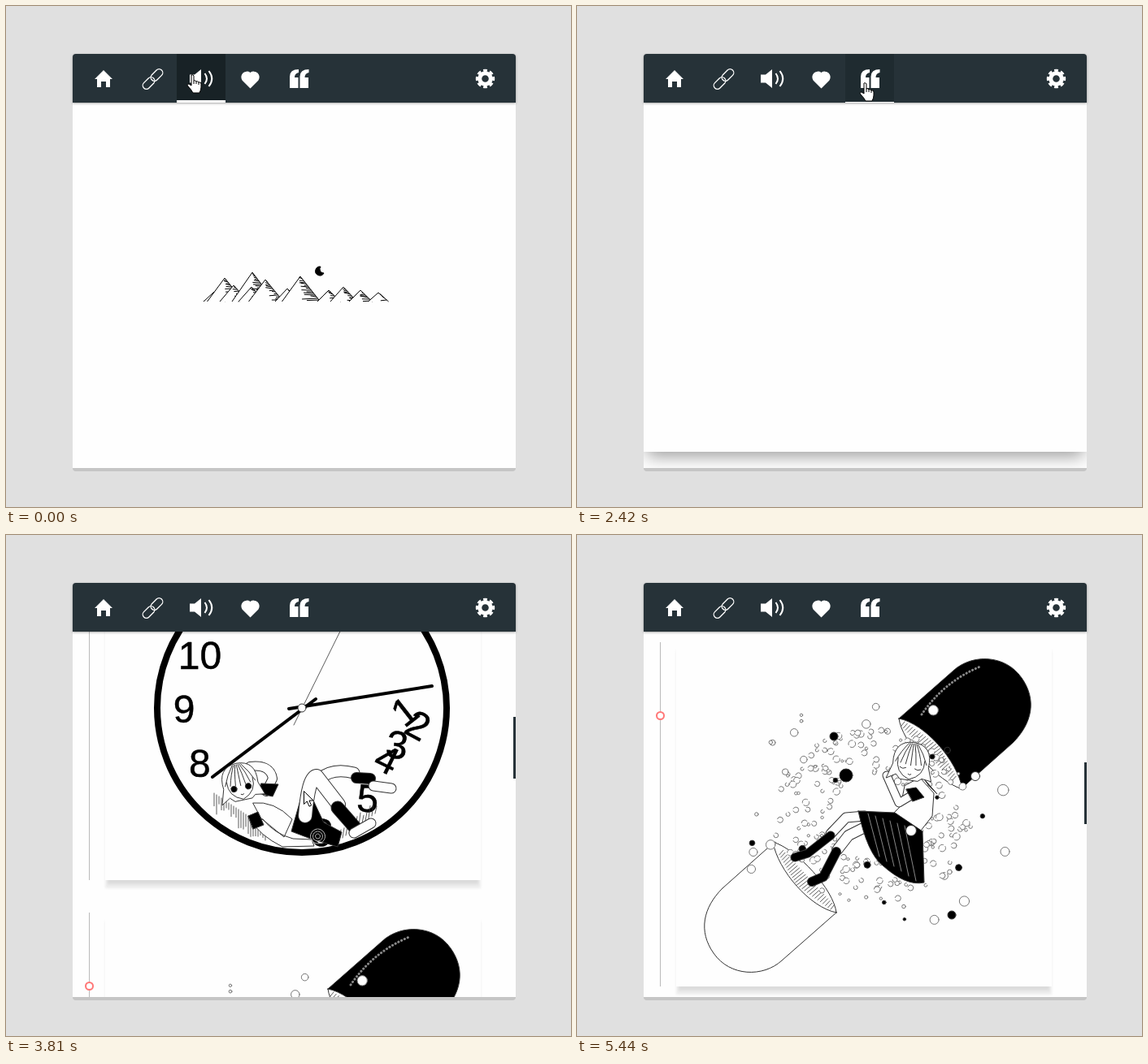
These frames come from a looping animation (695x617 px, 5.72 s). An HTML page:

```html
<!DOCTYPE html>
<html lang="en">
<head>
<meta charset="utf-8">
<title>Sliding tab panels</title>
<style>
html, body { margin: 0; width: 100%; height: 100%; overflow: hidden; background: #e0e0e0; }
#stage { position: relative; width: 695px; height: 617px; overflow: hidden; background: #e0e0e0; }
#stage div, #stage svg { position: absolute; box-sizing: border-box; }
#view { left: 82px; top: 119px; width: 545px; height: 450px; overflow: hidden; background: #fefefe; }
#base { left: 82px; top: 561px; width: 545px; height: 12px; border-radius: 0 0 4px 4px; background: #c5c5c5; }
#bar { left: 82px; top: 59px; width: 545px; height: 60px; border-radius: 4px 4px 0 0; background: #263238; box-shadow: 0 1px 3px rgba(0,0,0,.35); }
.panel, .scroll { left: 0; top: 0; width: 545px; height: 450px; }
.panel { background: #fefefe; box-shadow: 0 9px 20px -4px rgba(0,0,0,.4); }
.scroll { overflow: hidden; }
#thumb { right: 0; width: 3px; height: 76px; background: #263238; }
.item { left: 0; width: 545px; height: 424px; }
.line { left: 20px; top: 0; width: 1px; height: 424px; background: #bbb; }
.dot { left: 15px; top: 85px; width: 11px; height: 11px; border: 2px solid #f77; border-radius: 50%; background: #fff; }
.card { left: 40px; top: 0; width: 462px; height: 424px; background: #fefefe; box-shadow: 0 10px 3px rgba(0,0,0,.07), 0 8px 3px -3px rgba(0,0,0,.07); }
.caption { left: 0; top: 245px; width: 462px; height: 112px; padding: 24px; background: rgba(0,0,0,.4); color: #fff; font: 14.3px/16px "Liberation Sans", Arial, sans-serif; text-align: justify; }
.tag { left: 35px; top: 83px; top: 70px; width: 84px; height: 25px; border-radius: 12px 12px 12px 0; background: #999; color: #fff; font: bold 10px/25px "Open Sans", sans-serif; text-align: center; white-space: nowrap; box-shadow: 1px 2px 3px rgba(0,0,0,.25); }
.art { left: 0; top: 0; fill: #fefefe; stroke: #333; stroke-linejoin: round; stroke-linecap: round; }
.art .k { fill: #000; }
.art .n { fill: none; }
.art .h { fill: url(#hatch); }
.art text { fill: #000; stroke: #000; stroke-width: .5; font: 48px "Liberation Sans", Arial, sans-serif; text-anchor: middle; }
</style>
</head>
<body>
<div id="stage">
  <div id="base"></div>
  <div id="view">
    <svg id="hills" width="545" height="450" viewBox="82 119 545 450" stroke="#000"></svg>
    <div class="panel" id="blank"></div>
    <div class="panel" id="posts"><div class="scroll"><div id="list"></div><div id="thumb"></div></div></div>
  </div>
  <svg id="bar" width="545" height="60" viewBox="82 59 545 60">
    <g id="audio"><path d="M210 59h60v60h-60z" fill="#182226"/><rect x="210" width="60" fill="#fff"/></g>
    <g id="quote"><path d="M330 59h60v60h-60z" fill="#182226"/><rect x="330" width="60" fill="#fff"/></g>
    <g fill="#fff">
      <path d="M120 79l11 11h-3v10h-5v-7h-6v7h-5V90h-3z"/>
      <path d="M226 84.500h6l8-6.500v23l-8-6.500h-6z"/>
      <path d="M300.500 101.500l-10-10A7 7 0 0 1 300.500 82a7 7 0 0 1 10 9.500z"/>
      <path id="mark" d="M360 78v4q-5 1-5 6h4.500v13h-10.500V87q0-9 11-9z"/>
      <use href="#mark" x="12.500"/>
    </g>
    <g fill="none" stroke="#fff">
      <path d="M244.500 83q5 6.500 0 13M249.500 80q7.500 9.500 0 19" stroke-width="2"/>
      <g transform="rotate(-45 180.500 90)" stroke-width="1.300">
        <rect x="165" y="85.500" width="17" height="9" rx="4.500"/>
        <rect x="179" y="85.500" width="17" height="9" rx="4.500"/>
      </g>
      <circle cx="589.500" cy="89.500" r="6.800" stroke-width="5"/>
      <circle cx="589.500" cy="89.500" r="9.700" stroke-width="4" pathLength="16" stroke-dasharray="1.200 .8" stroke-dashoffset=".6"/>
    </g>
  </svg>
  <svg width="695" height="617" fill="#fff" stroke="#000">
    <defs><pattern id="hatch" width="7" height="31" patternUnits="userSpaceOnUse">
      <path d="M0 0h7v31H0z" fill="#fefefe" stroke="none"/>
      <path d="M1 0v31M3 4v22M5 0v13M5.500 16v15" stroke="#444" stroke-width=".8"/>
    </pattern></defs>
    <path id="hand" d="M6 1Q8 0 9 2V8Q11 7 12 9Q14 8 15 10Q18 9 18 12V16Q18 19 16 23H8Q6 19 2 15Q0 12 3 12L6 14ZM9 8v4M12 9v3M15 10v3"/>
    <path id="arrow" d="M.5.5V16.500L4.300 13L7 19.200L9.600 18L7 12H12Z"/>
  </svg>
</div>
<script>
// The picture moves in 42 even steps per loop; all motion below is timed in steps.
const LOOP = 5720, STEP = LOOP / 42;
const TEXT = 'Sed non mauris vitae erat consequat auctor eu in elit. Class aptent taciti sociosqu ad litora torquent per conubia nostra, per inceptos himenaeos. Mauris in erat justo. Nullam ac urna eu felis dapibus condimentum sit amet a augue.';
const $ = id => document.getElementById(id);

let seed = 7;
const rand = (a = 0, b = 1) => {
  seed = (seed * 16807) % 2147483647;
  return a + (b - a) * seed / 2147483647;
};
const repeat = (n, draw) => Array.from({ length: n }, (_, i) => draw(i)).join('');
const path = (d, cls = '', extra = '') => `<path class="${cls}" d="${d}" ${extra}/>`;
const dot = (x, y, r, cls = '') => `<circle class="${cls}" cx="${x}" cy="${y}" r="${r}"/>`;
const tube = (d, width, color = '#fefefe') =>
  path(d, 'n', `stroke-width="${width}"`) + path(d, 'n', `stroke-width="${width - 2}" stroke="${color}"`);

function head(x, y, scale, tilt, awake) {
  const eye = side => awake ? dot(side * 10, 7, 4, 'k') : path(`M${side * 10 - 4} 8q4 3 8 0`, 'n');
  return `<g transform="translate(${x} ${y}) rotate(${tilt}) scale(${scale})">` +
    path('M-24 4Q-27-26 0-27Q27-26 24 4L30 22L17 20L12 24H-12L-18 18L-30 25Z') +
    path('M-18-4Q-20 16 0 23Q20 16 18-4', 'n') + eye(-1) + eye(1) + path('M-2 16q2 2 4 0', 'n') +
    path(repeat(7, i => `M${(i - 3) * 2}-25Q${(i - 3) * 5}-14 ${(i - 3) * 7} ${4 - Math.abs(i - 3)}`), 'n') + '</g>';
}

function hills() {
  const peaks = [[256, 352], [269, 335], [280, 344], [303, 328], [302, 346], [319, 337],
    [346, 348], [362, 333], [397, 350], [415, 346], [436, 350], [458, 353]];
  return peaks.map(([x, y]) => {
    const base = 364, height = base - y;
    let d = `M${x - height * .5 - 7} ${base}L${x} ${y}L${x + height * .6 + 6} ${base}`;
    for (let h = 3; h < height; h += 2) {
      const edge = h * (.6 + 6 / height);
      d += `M${x + edge} ${y + h}l${-rand(.2, .8) * (edge + 3)} ${rand(-2, 1)}`;
    }
    return path(d, '', 'fill="#fefefe"');
  }).join('') + path('M387 321a5.500 5.500 0 1 0 4 8a5 5 0 0 1-4-8z');
}

function sandwich() {
  const slice = 'M262 276Q238 270 233 281Q230 294 274 314Q345 351 385 353Q403 351 403 342Q397 329 409 325L510 297Q515 293 509 290L414 250Q405 244 397 247z';
  const arm = (x, y) => tube(`M${x} ${y}l-85 35`, 15) + tube(`M${x - 82} ${y + 34}l-18 7`, 6) +
    path(`M${x - 26} ${y - 5}l20-5l14 21l-17 6z`, 'k') + path(`M${x - 18} ${y - 6}l14 20M${x - 12} ${y - 8}l14 20`, 'n', 'stroke="#fefefe"');
  const leg = (x, y, tilt) => `<g transform="translate(${x} ${y}) rotate(${tilt})">` +
    path('M-9 50L-10 88H10L9 50z') + path('M-8 2H8L10 52H-9z', 'k') +
    path('M8-14Q20-18 26-6Q26 6 10 4Q20-5 8-14z', 'k') + path('M-8 4Q-14-18 0-19Q10-18 13-11L8 4Q0-4-8 4z') + '</g>';
  return leg(428, 202, -5) + leg(528, 203, 18) +
    path('M516 334L541 347L538 352Q527 348 517 365zM235 374Q217 376 218 384L285 424L515 386L500 372z') +
    path('M285 418L290 431Q336 455 370 463Q400 465 403 456V436L514 396V380L405 413L370 431z', 'h') +
    path('M285 416Q303 423 311 426Q318 422 327 430Q345 429 350 435Q361 425 375 431Q388 417 402 421Q410 402 429 410Q443 398 466 401L515 380L390 376L300 395z') +
    path('M350 397L364 402L380 418Q365 414 350 397zM400 384L427 395L424 397zM308 371L335 375L320 384zM398 378L506 327L520 380L430 384z', 'k') +
    path(repeat(3, i => `M400 ${372 + i * 4}L${510 + i * 3} ${338 + i * 14}`), 'n', 'stroke="#bbb" stroke-width=".8"') +
    path('M270 388L345 378L400 374L380 383L294 426z') + arm(251, 401) + arm(292, 412) +
    path('M222 318L234 311L402 356L510 311L523 319L519 326L400 374L350 371L284 354z') + head(268, 367, 1.05, 5, true) +
    path('M233 281L235 311Q265 334 320 355Q368 380 395 377Q404 373 404 351L512 319V293L404 326z', 'h') + path(slice) +
    repeat(9, () => dot(rand(300, 470), rand(272, 312), rand(.4, 1), 'k')) + dot(379, 302, 2, 'k');
}

function clock() {
  const digit = (n, x, y, tilt = 0) => `<text y="17" transform="translate(${x} ${y}) rotate(${tilt})">${n}</text>`;
  const fallen = [[490, 217, -38], [507, 234, 28], [481, 258, 8], [469, 276, 26], [445, 324, 4], [388, 366, 8]];
  return '<circle cx="364" cy="213" r="178" stroke="#000" stroke-width="8"/>' +
    repeat(5, i => digit(i + 8, 364 - 145 * Math.cos((i - 1) * Math.PI / 6), 214 - 133 * Math.sin((i - 1) * Math.PI / 6))) +
    fallen.map(([x, y, tilt], i) => digit(i + 1, x, y, tilt)).join('') +
    path('M348 214L524 186M381 202L254 298', 'n', 'stroke="#000" stroke-width="4"') +
    path('M354 234L438 64', 'n', 'stroke-width=".8"') + dot(364, 213, 5) +
    path(repeat(22, i => `M${256 + i * 3} ${318 + i * 2}v${rand(8, 24)}`) + repeat(14, i => `M${402 + i * 4} ${382 - i * 3}l2 ${-rand(5, 16)}`), 'n', 'stroke-width=".8"') +
    tube('M300 285Q325 282 328 300L320 316', 12) +
    path('M314 306L335 307L328 322L310 318z', 'k') +
    path('M304 330Q330 327 352 350L342 372L314 349zM301 351L316 350Q330 368 353 374L376 375L379 383L340 384Q312 370 301 351z') +
    path('M298 346L310 341L317 357L304 362z', 'k') + head(288, 305, .9, -12, true) +
    path('M368 306L351 365L372 373L408 384L413 366L391 354z', 'k') +
    tube('M386 300Q402 286 428 293', 15) + tube('M431 299L448 300', 14, '#000') + tube('M452 309L474 312', 13) +
    tube('M368 346Q372 298 382 297L409 332', 18) + tube('M408 336L429 360', 17, '#000') + tube('M428 367L449 355', 13) +
    repeat(3, i => path(`M383 ${371 - 3 - i * 3}a${3 + i * 3} ${3 + i * 3} 0 1 0 1 0`, 'n', 'stroke="#bbb"'));
}

function capsule() {
  const half = cls => path('M396 226L463 167C486 146 527 147 547 176C566 203 560 232 536 256L472 313z', cls) +
    path('M396 226C428 232 468 278 474 313C444 304 399 254 396 226z') +
    path(repeat(26, i => `M${399 + i * 2.5} ${235 + i * 2.7}l${4 + Math.min(i, 26 - i) * .7} ${-5 - Math.min(i, 26 - i) * .4}`), 'n', 'stroke-width=".8"');
  const bubble = (near, far, size, cls) => {
    const a = rand(0, 2 * Math.PI), reach = rand(near, far);
    return dot(366 + Math.cos(a) * 112 * reach, 346 + Math.sin(a) * 96 * reach, rand(1.5, size), cls);
  };
  return `<g transform="rotate(180 357.500 345.500)">${half('')}</g>` + half('k') +
    path('M424 221Q451 181 496 162', 'n', 'stroke="#888" stroke-width="3" stroke-dasharray=".2 4"') +
    `<g stroke="#777" stroke-dasharray="9 3">${repeat(220, () => bubble(.5, 1.12, 4.5))}</g>` +
    `<g stroke="#777">${repeat(22, () => bubble(1, 1.55, 7))}</g>` + repeat(13, () => bubble(.6, 1.4, 4.5, 'k')) +
    dot(331, 296, 8, 'k') + dot(316, 248, 5, 'k') + dot(461, 468, 5, 'k') +
    tube('M354 346L331 348L312 368', 13) + tube('M312 370L284 392L268 397', 11, '#000') +
    tube('M358 358L334 370L320 388', 14) + tube('M319 390L303 421L289 427', 12, '#000') +
    path('M403 309L398 334L390 342L423 364L437 346L439 318L422 299z') +
    path('M346 340L391 342L425 365L427 428Q405 433 376 407Q357 392 346 340z', 'k') +
    path(repeat(6, i => `M${358 + i * 9} ${343 + i * 3}L${372 + i * 9} ${396 + i * 6}`), 'n', 'stroke="#aaa" stroke-width=".8"') +
    tube('M416 318L396 330L381 296', 11) +
    path('M405 313L417 311L427 323L413 328zM424 297L443 319L434 310z', 'k') +
    head(411, 280, .92, 8, false) + dot(437, 273, 3, 'k') + dot(411, 364, 6.5) + dot(490, 297, 5.5);
}

const items = [
  { draw: sandwich, top: 123, hover: [24, 26] },
  { draw: clock, top: 1, hover: [29, 33] },
  { draw: capsule, top: 132, hover: [33, 37], tag: '18PM - 03/05/16' }
];
$('hills').innerHTML = hills();
$('list').innerHTML = items.map(({ draw, top, tag }, i) => `<div class="item" style="top:${40 + 464 * i}px">
  <div class="line"></div><div class="dot"></div>
  <div class="card"><svg class="art" width="462" height="424" viewBox="122 ${top} 462 424">${draw()}</svg>
  <div class="caption">${TEXT}</div></div>${tag ? `<div class="tag">${tag}</div>` : ''}</div>`).join('');
const nodes = document.querySelectorAll('.item');

// Key points: [step, ...values].
const pointer = [[2, 222, 84], [3, 262, 120], [4, 266, 184], [5, 258, 134], [7, 238, 96], [15, 238, 96],
  [17, 347, 94], [21, 347, 94], [22, 359, 151], [25, 366, 315], [37, 366, 315], [38, 604, 531], [39, 677, 597]];
const scrolling = [[25, 0], [28, 622], [29, 541], [31, 541], [34, 955]];

const ramp = (s, from, to) => Math.min(1, Math.max(0, (s - from) / (to - from)));
const glide = (s, from) => (1 - Math.cos(Math.PI * ramp(s, from, from + 4.1))) / 2;

function sample(keys, s) {
  const next = Math.max(1, keys.findIndex(k => k[0] > s));
  const last = keys[keys.length - 1];
  if (s >= last[0]) return last.slice(1);
  const a = keys[next - 1], b = keys[next], u = ramp(s, a[0], b[0]);
  return a.slice(1).map((v, i) => v + (b[i + 1] - v) * u);
}

function setPanel(id, open) {
  $(id).style.transform = `translateY(${Math.round(450 * (open - 1))}px)`;
  $(id).style.visibility = open > .001 ? 'visible' : 'hidden';
}

function setTab(id, on) {
  const [back, line] = $(id).children, height = Math.round(3 * on);
  back.setAttribute('opacity', on);
  line.setAttribute('y', 119 - height);
  line.setAttribute('height', height);
}

function setCaption(item, [enter, leave], s) {
  const shown = ramp(s, enter, enter + 2), gone = ramp(s, leave, leave + 2.6);
  const caption = item.querySelector('.caption'), tag = item.querySelector('.tag');
  caption.style.transform = `translateY(${200 * gone - 118 * (1 - shown)}px)`;
  caption.style.opacity = shown * (1 - gone);
  if (tag) tag.style.opacity = shown * (1 - gone);
}

function render(time) {
  const s = Math.floor((time + 40) / STEP) % 42;
  setPanel('blank', glide(s, 10.5) - glide(s, 17.45));
  setPanel('posts', glide(s, 18.65));
  setTab('audio', 1 - ramp(s, 3, 5) + ramp(s, 5, 7) - ramp(s, 9, 11));
  setTab('quote', ramp(s, 15, 17) - ramp(s, 17, 18.7));

  const [scroll] = sample(scrolling, s);
  $('list').style.transform = `translateY(${-Math.round(scroll)}px)`;
  $('thumb').style.top = Math.round(scroll * 450 / 2664) + 'px';
  items.forEach((item, i) => setCaption(nodes[i], item.hover, s));

  const [x, y] = sample(pointer, s), overBar = y < 119;
  for (const [id, shown] of [['hand', overBar], ['arrow', !overBar]]) {
    $(id).setAttribute('transform', `translate(${x} ${y})`);
    $(id).setAttribute('visibility', shown && s < 40 ? 'visible' : 'hidden');
  }
}

const start = performance.now();
function loop() {
  render((performance.now() - start) % LOOP);
  requestAnimationFrame(loop);
}
loop();
</script>
</body>
</html>
```
